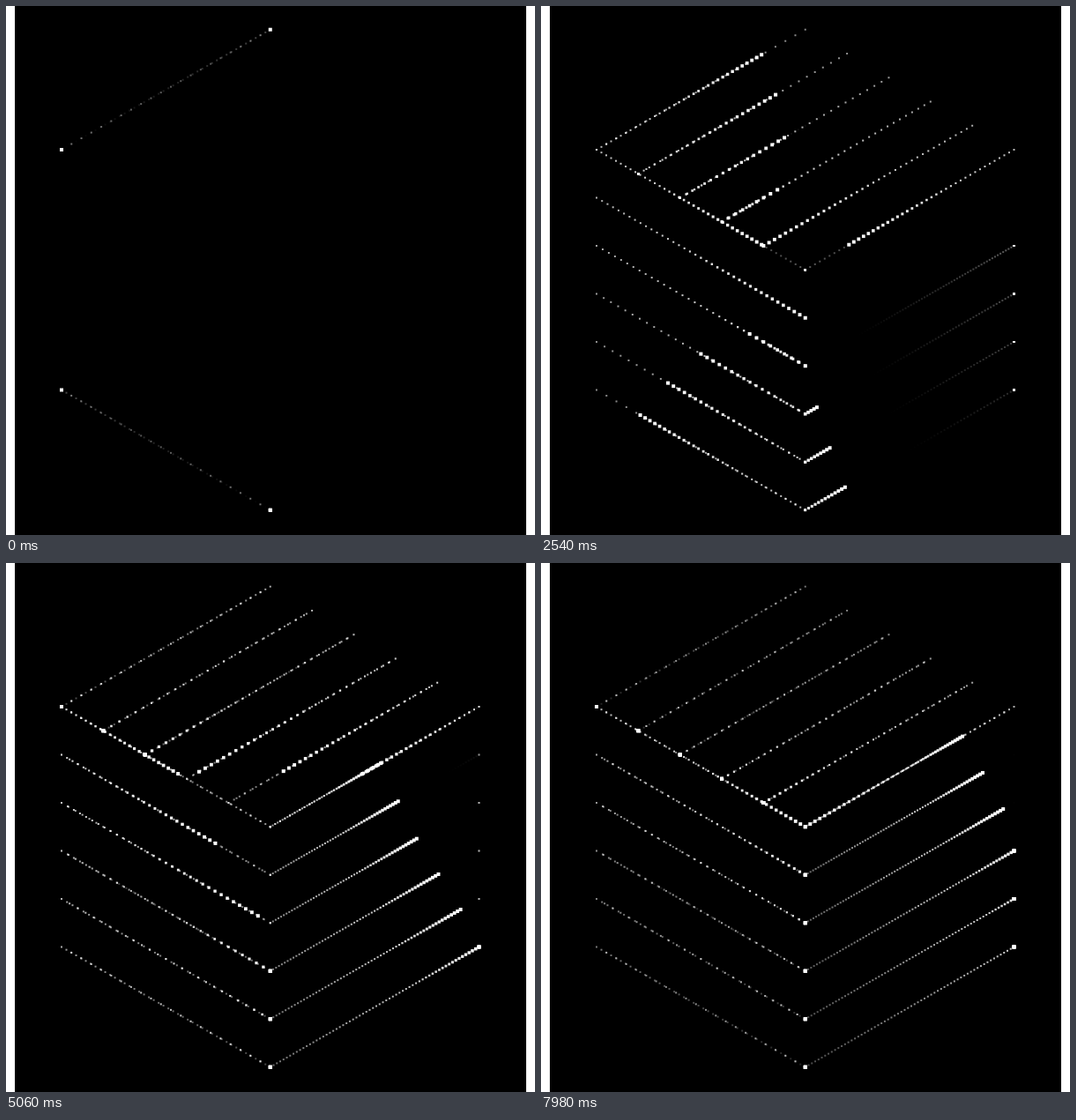
Write an HTML page with a canvas that moves like this. It is 600 by 600 pixels and loops after 8000 ms.

```html
<!DOCTYPE html>
<html lang="en">
<head>
<meta charset="utf-8">
<title>Dotted cube</title>
<style>
html, body { margin: 0; width: 100%; height: 100%; overflow: hidden; background: #fff; }
canvas { display: block; width: 600px; height: 600px; }
</style>
</head>
<body>
<canvas id="stage" width="600" height="600"></canvas>
<script>
const ctx = document.getElementById('stage').getContext('2d');
const LOOP = 8000;
const CYCLE = 150;   // steps before the motion plays backwards
const BEAT = 4.25;   // steps of delay between neighbouring lines
const LIFE = 131;    // steps until a dot has faded
const LEFT = 63, TOP = 163, DX = 47.35, DY = 27.25;

// Grid point: a runs up-right, b runs down-right, c runs straight down.
const point = (a, b, c) => [LEFT + DX * (a + b), TOP + DY * (b - a + 2 * c)];

// Turns are given in beats and fall on whole steps, so a dot marks every end.
const makeLine = (from, to, beats) => ({ from, to, turns: beats.map(b => Math.round(b * BEAT)) });
const lines = [];
for (let k = 0; k < 6; k++) {
  const sweep = [k, 5 + 2 * k, 15 + k, 20 + 2 * k];
  lines.push(
    makeLine(point(5, k, 0), point(0, k, 0), sweep),
    makeLine(point(0, 0, 5 - k), point(0, 5, 5 - k), sweep),
    makeLine(point(0, 5, 5 - k), point(5, 5, 5 - k), [10 + k, 25 + 2 * k])
  );
}

function headAt({ from, to, turns }, step) {
  let p = 1;
  const next = turns.findIndex(turn => step < turn);
  if (next > 0) {
    const start = turns[next - 1];
    const q = (step - start) / (turns[next] - start);
    p = next % 2 ? q : 1 - q;
  }
  return from.map((v, i) => v + (to[i] - v) * p);
}

function drawLine(line, step) {
  const start = line.turns[0];
  if (step < start) return;
  for (let age = LIFE - 1; age >= 0; age--) {
    // Dots of the previous cycle go on fading.
    const born = (step - age + CYCLE) % CYCLE;
    if (born < start) continue;
    const [x, y] = headAt(line, born);
    const size = Math.max(2, 4 - age * 0.09);
    ctx.globalAlpha = (1 - age / LIFE) ** 1.2;
    ctx.fillRect(x - size / 2, y - size / 2, size, size);
  }
}

// Three steps per 140 ms, held for 20, 100 and 20 ms.
function stepAt(time) {
  const rest = time % 140;
  const n = 3 * Math.floor(time / 140) + (rest < 20 ? 0 : rest < 120 ? 1 : 2);
  return n < CYCLE ? n : 2 * CYCLE - 1 - n;
}

function draw(step) {
  ctx.globalAlpha = 1;
  ctx.fillStyle = '#fff';
  ctx.fillRect(0, 0, 600, 600);
  ctx.fillStyle = '#000';
  ctx.fillRect(10, 0, 580, 600);
  ctx.fillStyle = '#fff';
  lines.forEach(line => drawLine(line, step));
}

let origin = null, shown = -1;
function tick(now) {
  if (origin === null) origin = now;
  const step = stepAt(Math.max(0, now - origin) % LOOP);
  if (step !== shown) draw(shown = step);
  requestAnimationFrame(tick);
}
draw(0);
requestAnimationFrame(tick);
</script>
</body>
</html>
```
